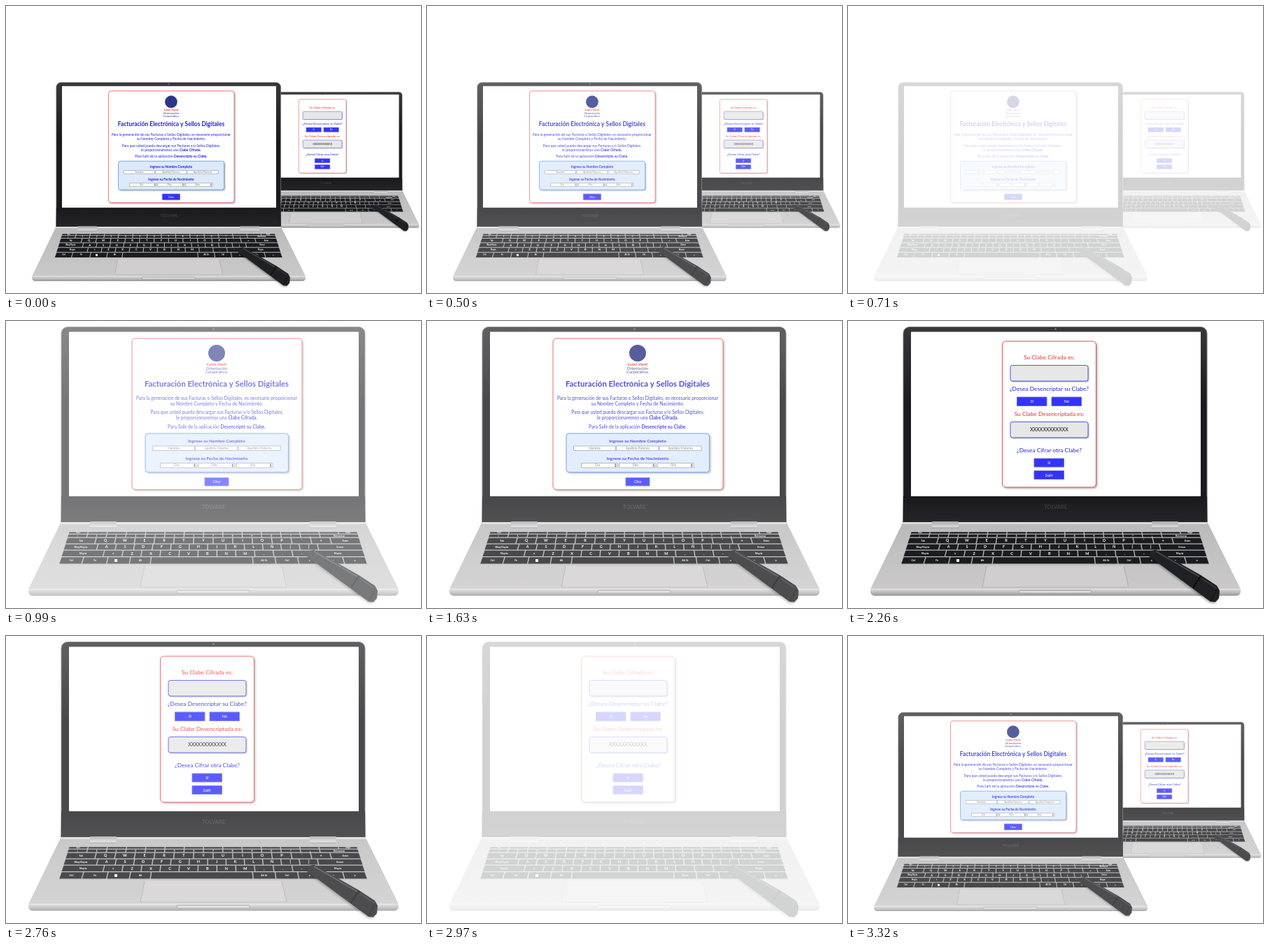
An HTML page with a canvas that plays this animation: 593x411 px, repeating every 3390 ms.

```html
<!DOCTYPE html>
<html lang="es">
<head>
<meta charset="utf-8">
<title>Facturación Electrónica</title>
<style>
  html, body { margin: 0; width: 100%; height: 100%; overflow: hidden; background: #fff; }
  canvas { display: block; }
</style>
</head>
<body>
<canvas id="stage" width="593" height="411"></canvas>
<script>
const ctx = document.getElementById('stage').getContext('2d');
const BLUE = '#2222dd', RED = '#ee2c30', FRAME = '#f0484c', BUTTON = '#3333fa', GREY = '#77777c';

function poly(points, fill) {
  ctx.beginPath();
  points.forEach(([x, y]) => ctx.lineTo(x, y));
  ctx.closePath();
  ctx.fillStyle = fill;
  ctx.fill();
}

function line(x1, y1, x2, y2, color, width = 1) {
  ctx.beginPath();
  ctx.moveTo(x1, y1);
  ctx.lineTo(x2, y2);
  ctx.strokeStyle = color;
  ctx.lineWidth = width;
  ctx.stroke();
}

// Canvas shadows ignore the transform, so scale them here
function castShadow(blur, dx, dy, alpha) {
  const scale = ctx.getTransform().a;
  ctx.shadowColor = `rgba(0,0,0,${alpha})`;
  ctx.shadowBlur = blur * scale;
  ctx.shadowOffsetX = dx * scale;
  ctx.shadowOffsetY = dy * scale;
}

function box(x, y, w, h, r, fill, stroke, shadow = 0) {
  ctx.beginPath();
  ctx.roundRect(x, y, w, h, r);
  ctx.save();
  if (shadow) castShadow(shadow, shadow * .6, shadow * .6, .35);
  ctx.fillStyle = fill;
  ctx.fill();
  ctx.restore();
  if (stroke) {
    ctx.strokeStyle = stroke;
    ctx.lineWidth = 1;
    ctx.stroke();
  }
}

function gradient(y1, y2, ...colors) {
  const g = ctx.createLinearGradient(0, y1, 0, y2);
  colors.forEach((c, i) => g.addColorStop(i / (colors.length - 1), c));
  return g;
}

// y is the middle of the lowercase letters
function text(str, x, y, size, color, style = '', align = 'center') {
  ctx.font = `${style} ${size}px Lato, sans-serif`;
  ctx.textAlign = align;
  ctx.fillStyle = color;
  ctx.fillText(str, x, y + size * .34);
  return ctx.measureText(str).width;
}

function boldEnding(plain, bold, x, y, size) {
  ctx.font = `bold ${size}px Lato, sans-serif`;
  const boldWidth = ctx.measureText(bold).width;
  ctx.font = `${size}px Lato, sans-serif`;
  const left = x - (boldWidth + ctx.measureText(plain).width) / 2;
  const plainWidth = text(plain, left, y, size, BLUE, '', 'left');
  text(bold, left + plainWidth, y, size, BLUE, 'bold', 'left');
}

function button(label, x, y, w, h, size) {
  box(x, y, w, h, 0, BUTTON, '#6868e8');
  text(label, x + w / 2, y + h / 2, size, '#fff', 'italic');
}

function field(label, x, y, w, spinner) {
  box(x, y, w, 6.5, 0, '#fff', '#a5a5aa');
  text(label, x + w / 2 - (spinner ? 3 : 0), y + 3.3, 4.7, GREY);
  if (spinner) {
    const sx = x + w - 3;
    poly([[sx - 1.5, y + 2.7], [sx, y + .8], [sx + 1.5, y + 2.7]], '#333');
    poly([[sx - 1.5, y + 3.8], [sx, y + 5.7], [sx + 1.5, y + 3.8]], '#333');
  }
}

function invoiceForm() {
  const cx = 301;
  box(180, 25, 243, 216.5, 5, '#fff', FRAME, 3);
  ctx.beginPath();
  ctx.arc(cx, 46, 12, 0, 7);
  ctx.fillStyle = '#2c3687';
  ctx.fill();
  text('Lumo Varet', cx, 62, 5.6, RED, 'bold');
  text('Orientación', cx, 67.5, 5.9, '#2c3687');
  text('Corporativa.', cx, 73, 5.9, '#2c3687');
  text('Facturación Electrónica y Sellos Digitales', cx, 89.7, 11.4, BLUE, 'bold');
  text('Para la generación de sus Facturas o Sellos Digitales, es necesario proporcionar', cx, 110.3, 6.7, BLUE);
  text('su Nombre Completo y Fecha de Nacimiento.', cx, 118.3, 6.7, BLUE);
  text('Para que usted pueda descargar sus Facturas y/o Sellos Digitales,', cx, 131.2, 6.7, BLUE);
  boldEnding('le proporcionaremos una ', 'Clabe Cifrada.', cx, 139.2, 6.7);
  boldEnding('Para Salir de la aplicación ', 'Desencripte su Clabe.', cx, 152, 6.7);
  box(199, 161, 204.5, 55.5, 4, '#dceafc', '#5a8cee', 3);
  text('Ingrese su Nombre Completo', cx, 172, 6.3, BLUE, 'bold');
  ['Nombre', 'Apellido Paterno', 'Apellido Materno'].forEach((s, i) => field(s, 209.5 + i * 61.3, 179, 60));
  text('Ingrese su Fecha de Nacimiento', cx, 196.5, 6.3, BLUE, 'bold');
  ['Día', 'Mes', 'Año'].forEach((s, i) => field(s, 220.5 + i * 54.3, 203.5, 52, true));
  button('Cifrar', 284, 224.5, 34, 11.5, 4.8);
}

function keyPanel() {
  const cx = 287.5;
  box(220.5, 29, 134, 209, 5, '#fff', FRAME, 3);
  text('Su Clabe Cifrada es:', cx, 52, 8.4, RED);
  box(232, 63.5, 111, 22.5, 3, '#e7e7e7', '#4a58ee', 2);
  text('¿Desea Desencriptar su Clabe?', cx, 97.5, 8.4, BLUE);
  button('Si', 241.5, 109, 42.5, 12.5, 6.3);
  button('No', 291, 109, 42.5, 12.5, 6.3);
  text('Su Clabe Desencriptada es:', cx, 133, 8.4, RED);
  box(232, 144.5, 111, 22.5, 3, '#e7e7e7', '#4a58ee', 2);
  text('XXXXXXXXXXXX', cx, 155.5, 7, '#111');
  text('¿Desea Cifrar otra Clabe?', cx, 185, 8.4, BLUE);
  button('Si', 266, 197, 42.5, 12, 6.3);
  button('Salir', 266, 214.5, 42.5, 12, 6.3);
}

// Each row: left key, its width, single keys, right key, its width
const KEY_ROWS = [
  ['Esc', 1, '·············', 'Supr', 1],
  ['|', 1, '1234567890?¿', 'Retroceso', 2],
  ['Tab', 1.5, 'QWERTYUIOP´+', 'Enter', 1.5],
  ['Bloq Mayús', 1.8, 'ASDFGHJKLÑ{}', 'Entrar', 2.4],
  ['Mayús', 2.2, '<ZXCVBNM,.-', 'Mayús', 2.8],
];
const ROW_EDGES = [302, 305.5, 310.5, 319.5, 328.5, 338, 348.5];

const keyLeft = y => 90 - (y - 302) * .31;

function keyRow(top, bottom, keys) {
  const total = keys.reduce((sum, k) => sum + k[1], 0);
  const at = (u, y) => keyLeft(y) + (592 - 2 * keyLeft(y)) * u / total;
  const mid = (top + bottom) / 2;
  let u = 0;
  for (const [label, w] of keys) {
    const a = u, b = u + w;
    poly([[at(a, top) + .7, top + .3], [at(b, top) - .7, top + .3],
          [at(b, bottom) - .7, bottom - 1], [at(a, bottom) + .7, bottom - 1]], '#1b1c1f');
    text(label, at((a + b) / 2, mid), mid - .5, label.length > 1 ? 3.6 : Math.min(5.5, bottom - top - 1), '#fff', 'bold');
    u = b;
  }
}

function keyboard() {
  const l = keyLeft(349);
  poly([[90, 301.5], [502, 301.5], [592 - l, 349], [l, 349]], '#b6b5b6');
  KEY_ROWS.forEach(([left, lw, chars, right, rw], i) =>
    keyRow(ROW_EDGES[i], ROW_EDGES[i + 1], [[left, lw], ...[...chars].map(c => [c, 1]), [right, rw]]));
  keyRow(338, 348.5, [['Ctrl', 1.2], ['Fn', 1.3], ['', 1.2], ['Alt', 1.1], ['', 5.4],
    ['Alt Gr', 1.2], ['Ctrl', 1.2], ['<', 1.2], ['^ v', 1.2], ['>', 1.2]]);
  box(155, 341, 4, 4, 0, '#eee');
}

function pen() {
  ctx.save();
  castShadow(3, -1, 2, .3);
  poly([[430, 333], [433, 329], [440, 327.5], [505, 364.5], [527, 379], [531, 386],
        [530, 397], [525, 402.5], [518, 402], [493, 383.5], [431, 337.5]], '#202124');
  ctx.restore();
  line(440, 330, 502, 366, '#48494d', 1.5);
  line(506, 369, 526, 382.5, '#3c3d41', 1.5);
  line(504, 365, 493, 382, '#08080a', 1.5);
  line(527, 384, 519, 400, '#0c0c0e', 1);
}

function laptop(content) {
  // Lid and display
  box(79, 8.5, 434, 279.5, [9, 9, 0, 0], gradient(8, 120, '#38383b', '#1b1b1e'), '#7b7b7e');
  poly([[79, 251], [513, 251], [513.5, 288], [78.5, 288]], gradient(251, 288, '#1a1a1d', '#252428'));
  box(90, 15.5, 414, 235.5, 0, '#fff');
  ctx.beginPath();
  ctx.arc(296.5, 11.5, 1.2, 0, 7);
  ctx.fillStyle = '#77777c';
  ctx.fill();
  text('TOLVARE', 296.5, 266.5, 7.6, '#3e3e43', 'bold');

  // Deck
  poly([[78.5, 288], [513.5, 288], [561, 384], [32, 384]], gradient(288, 384, '#bab9ba', '#c3c2c3', '#cac8c9'));
  line(78.5, 289.5, 513.5, 289.5, '#dad9da', 3);
  for (const x of [120, 434]) {
    box(x, 287, 38, 9, 1, gradient(287, 296, '#a5a4a6', '#e4e3e4'));
    line(x, 296, x + 38, 296, '#88888b', .8);
  }
  keyboard();
  poly([[198, 351], [394, 351], [401, 381], [192, 381]], '#d0cecf');
  line(198, 351, 192, 381, '#a3a2a4', .8);
  line(394, 351, 401, 381, '#a3a2a4', .8);
  line(192, 381, 401, 381, '#b3b2b4', .8);

  // Front edge
  box(32, 384, 529, 9.5, [0, 0, 6, 6], gradient(384, 394, '#d9d8d9', '#b9b8ba', '#929193'));
  line(32, 384, 561, 384, '#ebeaeb', 1);
  box(244, 385.5, 104, 4.5, 2, '#d9d8d9', '#98989b');
  pen();
  content();
}

function placed(x, y, scale, content) {
  ctx.save();
  ctx.translate(x, y);
  ctx.scale(scale, scale);
  laptop(content);
  ctx.restore();
}

const SCENES = [
  () => {
    placed(307, 119, .505, keyPanel);
    placed(13.5, 103.2, .739, invoiceForm);
  },
  () => laptop(invoiceForm),
  () => laptop(keyPanel),
];

const HOLD = 500, STEP = 70, PERIOD = HOLD + 9 * STEP;

function draw() {
  const t = performance.now() % (PERIOD * SCENES.length);
  const local = t % PERIOD;
  let scene = Math.floor(t / PERIOD), opacity = 1;
  if (local >= HOLD) {
    // Stepped fade to white, then into the next scene
    const step = Math.floor((local - HOLD) / STEP);
    opacity = Math.abs(step - 4) / 5;
    if (step >= 4) scene = (scene + 1) % SCENES.length;
  }
  ctx.fillStyle = '#fff';
  ctx.fillRect(0, 0, 593, 411);
  SCENES[scene]();
  ctx.fillStyle = `rgba(255,255,255,${1 - opacity})`;
  ctx.fillRect(0, 0, 593, 411);
  requestAnimationFrame(draw);
}
draw();
</script>
</body>
</html>
```
